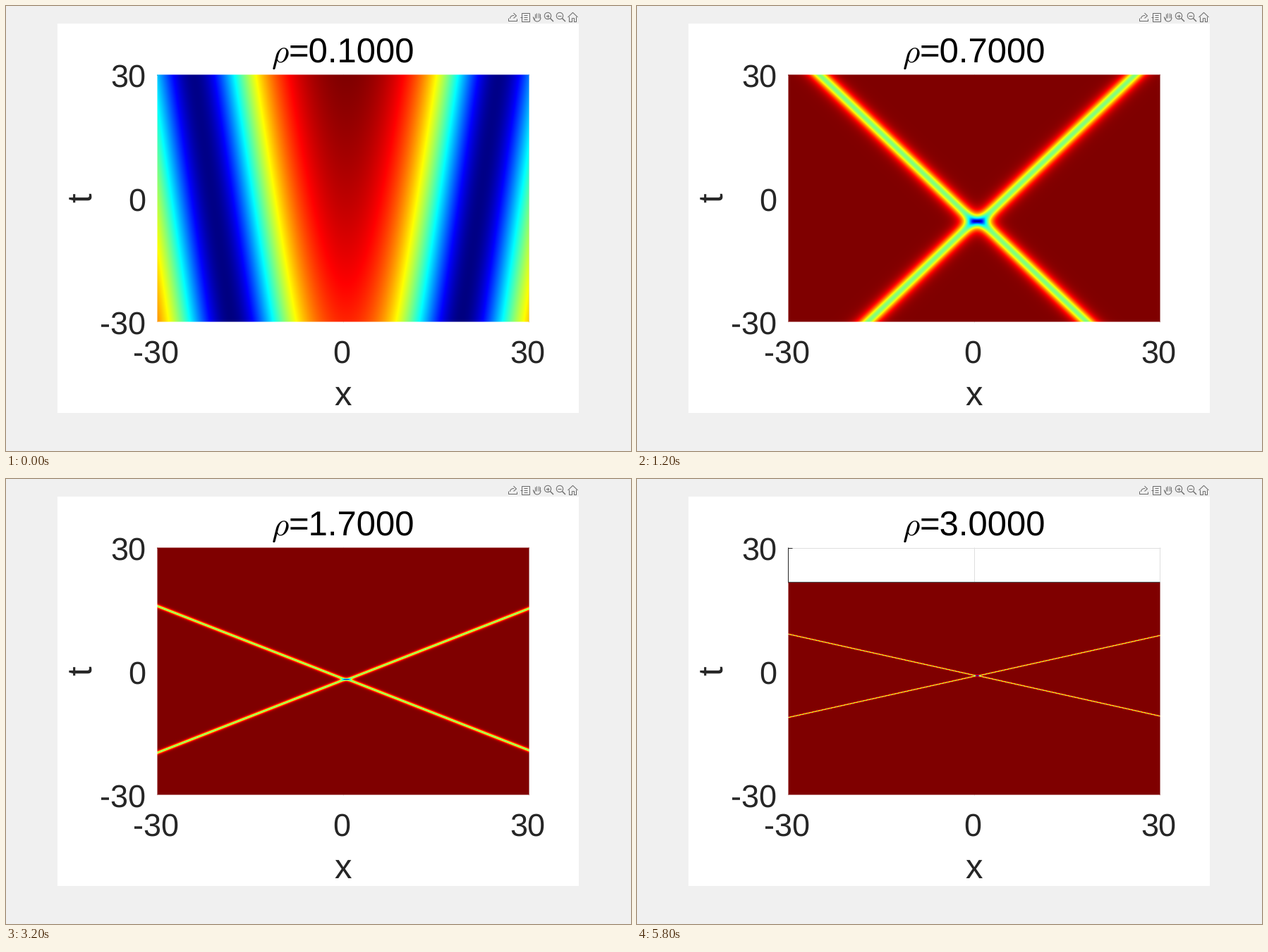
A matplotlib script for the animation above (6 s loop, 886 px wide and 632 px high).

```python
import matplotlib.pyplot as plt
import numpy as np
from matplotlib.animation import FuncAnimation
from matplotlib.patches import Arc, Circle, Rectangle

W, H, DPI = 886, 632, 64
PT = 72 / DPI                      # points per pixel
LEFT, TOP, NX, NY = 214, 97, 528, 352
RIGHT, BOTTOM = LEFT + NX, TOP + NY
FRAMES, STEP = 30, 200
SPAN = 30
K = np.sqrt(3)
SHIFT_X, SHIFT_T = 0.5, 3.5
INK, GRID, ICON = "#262626", "#dfdfdf", "#6a6a6a"
EDGE = (0.3, 0.36, 0.36, 1)
TICK, LABEL = 45, 49

plt.rcParams.update({
    "font.family": "Liberation Sans",
    "mathtext.fontset": "cm",
    "text.hinting": "none",
    "axes.unicode_minus": False,
})

fig = plt.figure(figsize=(W / DPI, H / DPI), dpi=DPI, facecolor="#f0f0f0")
ax = fig.add_axes([0, 0, 1, 1])
ax.axis("off")


def to_px(x, t):
    """Pixel position of a point of the plot."""
    return (LEFT + 0.5 + (x + SPAN) / (2 * SPAN) * (NX - 1),
            TOP + 0.5 + (SPAN - t) / (2 * SPAN) * (NY - 1))


def text(x, y, s, size, color=INK, ha="left", **kw):
    return ax.text(x, y, s, fontsize=size * PT, color=color,
                   ha=ha, va="baseline", **kw)


def line(xs, ys, color=ICON, width=1.0, z=2):
    return ax.plot(xs, ys, color=color, lw=width * PT, zorder=z,
                   solid_capstyle="butt")[0]


def outline(shape, *args, **kw):
    ax.add_patch(shape(*args, fill=False, ec=ICON, lw=PT, **kw))


def export_icon(x, y):
    line([x - 6, x - 6, x + 6, x + 6], [y + 2, y + 5.5, y + 5.5, y + 3])
    outline(Arc, (x + 1, y + 3), 10, 9, theta1=180, theta2=280)
    line([x + 1, x + 5, x + 1], [y - 5, y - 1, y + 2.5])


def note_icon(x, y):
    outline(Rectangle, (x - 5, y - 6), 11, 12)
    for row in (-3, 0, 3):
        line([x - 2, x + 3], [y + row, y + row])
    line([x - 7, x - 4], [y, y])


def hand_icon(x, y):
    outline(Arc, (x, y + 1), 10, 11, theta1=0, theta2=180)
    for k in range(4):
        fx = x - 3 + 2.4 * k
        line([fx, fx], [y + 1, y - 6 + abs(k - 1.5)])
    line([x - 3, x - 6], [y + 4, y])


def zoom_icon(x, y, plus):
    outline(Circle, (x - 1, y - 1), 4.7)
    line([x + 2.4, x + 7], [y + 2.4, y + 7], width=1.4)
    line([x - 3.5, x + 1.5], [y - 1, y - 1])
    if plus:
        line([x - 1, x - 1], [y - 3.5, y + 1.5])


def home_icon(x, y):
    line([x - 7, x, x + 7], [y + 1, y - 5.7, y + 1])
    for side in (-1, 1):
        line([x + side * d for d in (5, 5, 1.5, 1.5, 0)],
             [y, y + 6.5, y + 6.5, y + 2, y + 2])


def jet(v):
    rgb = [np.clip(1.5 - np.abs(4 * v - c), 0, 1) for c in (3, 2, 1)]
    return np.stack(rgb + [np.ones_like(v)], axis=-1)


X = np.linspace(-SPAN, SPAN, NX)
T = np.linspace(SPAN, -SPAN, NY)


def wave(rho):
    """Modulus of two colliding dark solitons, scaled to 0..1."""
    q0 = K * rho * SHIFT_T + np.log(2 / (K * rho))
    c = np.cosh(K * rho * (X - SHIFT_X))[None, :]
    b = 2 * np.cosh(K * rho ** 2 * T + q0)[:, None]
    u = np.sqrt(np.maximum(1 - 3 * (1 + b * c) / (b + c) ** 2, 0))
    crossing = -q0 / (K * rho ** 2)
    low = 0 if crossing > -SPAN else u.min()
    return (u - low) / (u.max() - low)


def overflow_rows(rho):
    """Rows above the time where exp() overflows; they stay empty."""
    limit = (709.78 - 2 * K * rho * SHIFT_T) / (2 * K * rho ** 2)
    return np.count_nonzero(T > np.floor(limit * 10) / 10)


def picture(rho):
    rgba = jet(wave(rho))
    empty = overflow_rows(rho)
    if empty:
        rgba[empty - 1] = EDGE
    # the border pixels are only half covered
    rgba[:, [0, -1], 3] = 0.5
    rgba[[0, -1], :, 3] = 0.5
    rgba[:max(empty - 1, 0), :, 3] = 0
    return rgba


ax.add_patch(Rectangle((73, 25), 739, 553, color="white", lw=0, zorder=0))

export_icon(718.5, 15)
note_icon(736, 15.5)
hand_icon(753, 15.5)
zoom_icon(769, 15, True)
zoom_icon(786, 15, False)
home_icon(803.5, 15)

for v in (-SPAN, 0, SPAN):
    px, py = to_px(v, v)
    text(px - 1.8, 507, str(v), TICK, ha="center")
    text(198.2, py + 17.5, str(v), TICK, ha="right")
    if v >= 0:
        line([px, px], [TOP, BOTTOM], GRID, z=1)
line([LEFT, RIGHT], [TOP + 0.5] * 2, GRID, z=1)
line([LEFT, LEFT + 6], [TOP + 0.5] * 2, INK, z=1.1)
axis = line([LEFT + 0.5] * 2, [TOP, TOP], INK, z=1.1)

text(478, 567, "x", LABEL, ha="center")
text(121.5, 279, "t", LABEL, rotation=90, rotation_mode="anchor")
text(376.5, 80, r"$\rho$", LABEL - 2, "black")
title = text(400.8, 80, "", LABEL, "black")

image = ax.imshow(picture(0.1), extent=(LEFT, RIGHT, BOTTOM, TOP),
                  interpolation="nearest", aspect="auto", zorder=3)
ax.set_xlim(0, W)
ax.set_ylim(H, 0)


def update(i):
    rho = (i + 1) / 10
    image.set_data(picture(rho))
    axis.set_ydata([TOP, TOP + overflow_rows(rho)])
    title.set_text(f"={rho:.4f}")
    return image, axis, title


anim = FuncAnimation(fig, update, frames=FRAMES, interval=STEP,
                     repeat=True, repeat_delay=0, blit=False)
plt.show()
```
